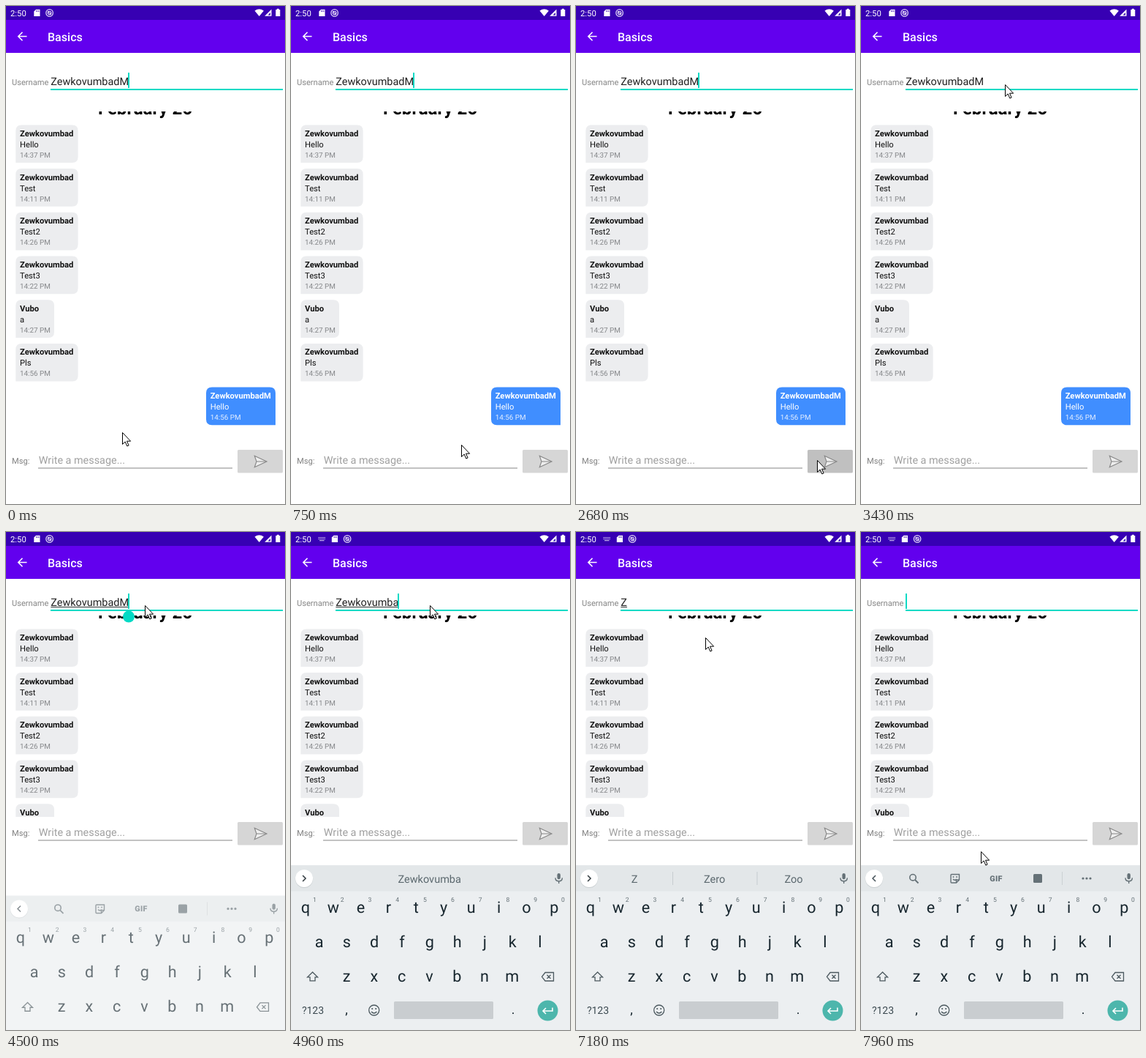
Animation of 382x680 px, one loop 8000 ms. Source, as an HTML page:

```html
<!DOCTYPE html>
<html lang="en">
<head>
<meta charset="utf-8">
<title>Chat screen</title>
<style>
  html, body { margin: 0; width: 100%; height: 100%; overflow: hidden; background: #fff; }
  svg { display: block; font-family: Roboto, sans-serif; text-rendering: geometricPrecision; }
  .mid { text-anchor: middle; }
  .line { fill: none; stroke: currentColor; }
</style>
</head>
<body>
<svg id="stage" width="382" height="680" viewBox="0 0 382 680"></svg>
<script>
const LOOP = 8000, USER = 'Zewkovumbad', NAME = USER + 'M';
const TAP = 4210, OPEN = 4500, CLEAR = 7500;

// time of each deletion, letters left, words in the suggestion strip
const EDITS = [
  [4720, 11, ['', USER, '']],
  [4890, 10, ['', USER.slice(0, 10), '']],
  [5070, 9, ['', USER.slice(0, 9), '']],
  [5250, 8, ['', USER.slice(0, 8), '']],
  [5430, 7, ['', USER.slice(0, 7), '']],
  [5610, 6, ['', USER.slice(0, 6), '']],
  [5820, 5, ['Zewko', 'Zewel', '']],
  [6000, 4, ['Zewk', 'Zewel', 'Zeu']],
  [6180, 3, ['Zew', 'Zevul', 'Zewdan']],
  [6390, 2, ['Ze', 'Zevu', 'Zeu']],
  [6680, 1, ['Z', 'Zero', 'Zoo']],
  [CLEAR, 0, null]
];
const BLINKS = [40, 540, 1040, 1540, 2040, 2540, 3040, 3540, 3930];
const CLICKS = [1150, 1860, 2540];
const MOUSE = [
  [390, 159, 582], [1180, 330, 620], [2860, 330, 620], [3430, 197, 107],
  [3680, 197, 107], [3750, 190, 100], [6820, 190, 100], [7180, 177, 144],
  [7500, 177, 144], [7960, 164, 436]
];

const text = (x, y, size, fill, s, extra = '') =>
  `<text x="${x}" y="${y}" font-size="${size}" fill="${fill}" ${extra}>${s}</text>`;
const rect = (x, y, w, h, fill, extra = '') =>
  `<rect x="${x}" y="${y}" width="${w}" height="${h}" fill="${fill}" ${extra}/>`;
const path = (d, fill, extra = '') => `<path d="${d}" fill="${fill}" ${extra}/>`;
const line = (d, color, width = 1.4, extra = '') =>
  `<path class="line" d="${d}" color="${color}" stroke-width="${width}" ${extra}/>`;
const circle = (x, y, r, fill, extra = '') =>
  `<circle cx="${x}" cy="${y}" r="${r}" fill="${fill}" ${extra}/>`;
const ring = (x, y, r, color, width = 1.4) =>
  circle(x, y, r, 'none', `stroke="${color}" stroke-width="${width}"`);

function bubble(i, name, body, time, w, mine) {
  const x = mine ? 274 : 13.3, y = 18.4 + i * 59.7, h = 51.7, r = 8;
  const bl = mine ? r : 0, br = mine ? 0 : r, base = Math.round(y + 15.4);
  const d = `M${x + r} ${y}h${w - 2 * r}q${r} 0 ${r} ${r}v${h - r - br}q0 ${br} ${-br} ${br}` +
    `h${bl + br - w}q${-bl} 0 ${-bl} ${-bl}v${bl + r - h}q0 ${-r} ${r} ${-r}z`;
  const ink = mine ? '#fff' : '#111';
  return path(d, mine ? '#408eff' : '#ecedef') +
    text(x + 5.7, base, 11.2, ink, name, 'font-weight="700"') +
    text(x + 5.7, base + 15, 11.2, ink, body) +
    text(x + 5.7, base + 29, 9.9, mine ? '#e4eeff' : '#85878a', time);
}

const chat = [
  [USER, 'Hello', '14:37 PM', 85.3], [USER, 'Test', '14:11 PM', 85.3],
  [USER, 'Test2', '14:26 PM', 85.3], [USER, 'Test3', '14:22 PM', 85.3],
  ['Vubo', 'a', '14:27 PM', 52.7], [USER, 'Pls', '14:56 PM', 85.3],
  [NAME, 'Hello', '14:56 PM', 95, true]
].map((m, i) => bubble(i, ...m)).join('');

const bars = rect(0, 0, 382, 64, '#6200ee') + rect(0, 0, 382, 19, '#3700b3') +
  text(6, 13.5, 11.3, '#fff', '2:50') +
  `<g id="kbIcon">${line('M37.5 7.5h9.5M37.5 9.5h9.5', '#e4dcf6', 1.2, 'stroke-dasharray="1.3 .7"')}
  ${line('M39 11.7h6.500', '#e4dcf6', 1)}</g>
  <g id="notes">${path('M41 4.7h5.5v9.2h-8.2V7.4z', '#fff')}${line('M41.5 6v2M43.2 6v2M44.9 6v2', '#3700b3', .7)}
  ${ring(59.6, 9.4, 4.7, '#e4dcf6', 1.3)}${ring(59.6, 9.4, 2.2, '#e4dcf6', 1.1)}${line('M57 6.8l5 5', '#e4dcf6', 1.1)}</g>` +
  path('M340.5 6.4q6.2-4.2 12.4 0l-6.2 7.6z', '#fff') +
  path('M363.5 4.5v9.3h-9.3z', '#fff') + path('M362 9v3.4h-3.4z', '#3700b3') +
  path('M369.3 5h1.5V3.7h3V5h1.5v9h-6z', '#fff') +
  line('M28.5 41.5H17M22.5 35.8l-5.7 5.7 5.7 5.7', '#fff', 1.6) +
  text(57, 48, 16, '#fff', 'Basics', 'font-weight="500"');

const userRow = text(8, 107.5, 11.1, '#858585', 'Username') +
  `<text id="user" x="61.3" y="108" font-size="14.45" fill="#212121"></text>` +
  rect(61, 113, 318, 2, '#03dac5') + rect(61.3, 109, 0, 1, '#333', 'id="under"') +
  rect(0, 91, 2, 21, '#03dac5', 'id="caret"');

const msgRow = text(8, 625, 11.1, '#808080', 'Msg:') +
  text(44.7, 625, 14.4, '#a0a0a0', 'Write a message...') +
  rect(44, 630.5, 266, 1, '#868686') +
  rect(317, 606, 62, 31.5, '#d6d6d6', 'rx="1.5"') +
  rect(317, 606, 62, 31.5, '#000', 'rx="1.5" id="ripple"') +
  path('M340.3 614.3L357 622l-16.7 7.7 2.7-7.7z', '#eee', 'stroke="#858585" stroke-width="1.1"') +
  line('M343 622h13', '#858585', 1);

const GRAY = '#657177', DARK = '#4c595f', INK = '#17262e';
const keys = (s, x, y) => [...s].map((c, i) =>
  text(x + i * 37.8, y, 21.6, INK, c, 'class="mid"')).join('');
const digits = [...'1234567890'].map((c, i) =>
  text(32.3 + i * 37.8, 505, 8.6, GRAY, c, 'class="mid"')).join('');

const tools = line('M20 469l-4 4 4 4', '#455158', 1.5) +
  ring(71, 471.7, 4.2, GRAY, 1.6) + line('M74 475l4.5 4.5', GRAY, 1.8) +
  line('M124 467.5h10.5v7.5l-4 4H124q-1 0-1-1v-9.5q0-1 1-1M130.5 479v-4h4M126 474q2.5 2.5 5 0', GRAY) +
  circle(126.5, 471, .9, GRAY) + circle(131, 471, .9, GRAY) +
  text(185, 477, 10.8, GRAY, 'GIF', 'class="mid" font-weight="900" letter-spacing=".4"') +
  rect(236, 467, 12, 12, GRAY, 'rx="1.5"') + rect(275, 464, 1, 18, '#cbd0d3') +
  [304, 309, 314].map(x => circle(x, 473, 1.6, GRAY)).join('');

const words = line('M16 469l4 4-4 4', '#30393e', 1.5) +
  [80, 189.7, 298].map((x, i) => text(x, 478.5, 14.5, '#5b686e', '', `class="mid" id="word${i}"`)).join('') +
  `<g id="split">${rect(132, 464, 1, 18, '#c6ccd0')}${rect(247.5, 464, 1, 18, '#c6ccd0')}</g>`;

const keyboard = rect(0, 455, 382, 36, '#e3e7e9') + rect(0, 490.5, 382, 190, '#eceff1') +
  circle(18, 473.8, 12.2, '#c9ced1') + circle(18, 473, 12, '#fff') +
  `<g id="tools">${tools}</g><g id="words">${words}</g>` +
  rect(364.5, 466, 4.4, 8.2, GRAY, 'rx="2.2"') +
  line('M362 472.3q0 4.5 4.7 4.5t4.7-4.5M366.7 477v3', GRAY) +
  keys('qwertyuiop', 20, 520) + digits + keys('asdfghjkl', 38.6, 567) + keys('zxcvbnm', 76, 614) +
  line('M29.5 601l-7 6.8h3.5v5h7v-5h3.5z', DARK, 1.3) +
  line('M348 601.5h11.5v11.5H348l-4.5-5.7zM350.5 604.7l5 5M355.5 604.7l-5 5', DARK, 1.3) +
  text(30, 658, 14, '#3c4a51', '?123', 'class="mid"') +
  text(76, 658, 18, INK, ',', 'class="mid"') + text(304, 658, 18, INK, '.', 'class="mid"') +
  ring(113.7, 653, 7, DARK, 1.3) + circle(111.2, 651, 1.1, DARK) + circle(116.2, 651, 1.1, DARK) +
  line('M110 655q3.7 4 7.4 0', DARK, 1.3) +
  rect(141, 641, 136, 24, '#c9cdd0', 'rx="1.5"') + circle(351.5, 653.5, 14, '#4db6ac') +
  line('M358 649.5v4.5h-12.5M349 650l-4 4 4 4', '#fff', 1.6);

const pointer = path('M.5.5v16l3.7-3.5 2.6 6 2.3-1-2.6-5.8h5.1z', '#fff', 'stroke="#000"');

const $ = id => document.getElementById(id);
$('stage').innerHTML = `${bars}<g id="userRow">${userRow}</g>
  <svg id="chat" width="382">${text(190.5, 3.8, 24, '#000', 'February 26', 'class="mid" font-weight="700"')}${chat}</svg>
  <g id="msgRow">${msgRow}</g>${circle(168, 122.5, 8, '#03dac5', 'id="handle"')}
  <g id="kb">${keyboard}</g><g id="mouse">${pointer}</g>`;

const set = (id, attrs) => { for (const k in attrs) $(id).setAttribute(k, attrs[k]); };
const show = (id, on) => set(id, { visibility: on ? 'visible' : 'hidden' });
const shift = (id, x, y) => set(id, { transform: `translate(${x} ${y})` });
const clamp = v => Math.max(0, Math.min(1, v));

function mouseAt(t) {
  const i = MOUSE.findIndex(m => m[0] > t);
  if (i < 0) return MOUSE.at(-1).slice(1);
  if (!i) return MOUSE[0].slice(1);
  const [t0, x0, y0] = MOUSE[i - 1], [t1, x1, y1] = MOUSE[i];
  const p = (t - t0) / (t1 - t0), e = p * p * (3 - 2 * p);
  return [Math.round(x0 + (x1 - x0) * e), Math.round(y0 + (y1 - y0) * e)];
}

function caretOn(t, edit) {
  if (t < TAP) return BLINKS.filter(b => b <= t).length % 2 === 0;
  const since = t - (edit ? edit[0] : TAP);
  return since % 1000 < 500;
}

function draw(t) {
  const open = t >= OPEN, edit = EDITS.filter(e => e[0] <= t).at(-1);
  const dy = open ? -7 : 0;

  shift('userRow', 0, dy);
  set('chat', open ? { y: 114, height: 275 } : { y: 144, height: 455 });
  shift('msgRow', 0, open ? -210 : 0);
  $('user').textContent = edit ? NAME.slice(0, edit[1]) : NAME;
  const w = $('user').textContent ? $('user').getComputedTextLength() : 0;
  set('under', { width: t >= 4250 ? w : 0 });
  set('caret', { x: Math.max(61, Math.floor(60.5 + w)) });
  show('caret', caretOn(t, edit));

  show('handle', t >= 4250 && !edit);
  shift('handle', 0, dy);
  set('ripple', { opacity: Math.max(...CLICKS.map(c =>
    t < c ? 0 : .14 * Math.min(clamp((t - c) / 60), clamp((c + 250 - t) / 150)))) });

  const p = clamp((t - OPEN) / 150);
  set('kb', { display: open ? 'inline' : 'none', opacity: .65 + .35 * p });
  shift('kb', 0, 42 * (1 - p) ** 2);
  const list = edit && edit[2];
  show('tools', !list);
  set('words', { display: list ? 'inline' : 'none' });
  if (list) {
    list.forEach((s, i) => $('word' + i).textContent = s);
    show('split', list[0]);
  }

  show('kbIcon', t >= 4600);
  shift('notes', t >= 4600 ? 17.5 : 0, 0);
  shift('mouse', ...mouseAt(t));
}

function tick() {
  draw(performance.now() % LOOP);
  requestAnimationFrame(tick);
}
tick();
</script>
</body>
</html>
```
